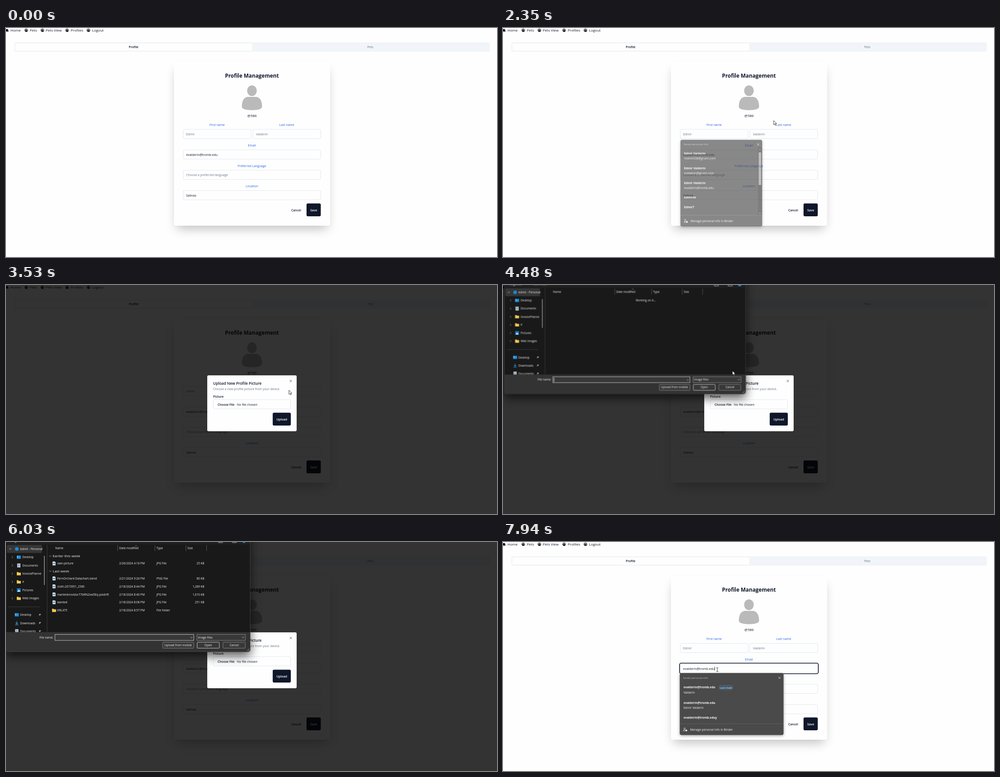
Write an HTML page that moves like this. It is 1093 px wide and 512 px high and loops after 8 s.

```html
<!DOCTYPE html>
<html lang="en">
<head>
<meta charset="utf-8">
<title>Profile management</title>
<style>
html, body { margin: 0; width: 100%; height: 100%; overflow: hidden; background: #fefefe; }
svg { display: block; width: 1093px; height: 512px; }
text { font: 400 6.9px "Open Sans", "Noto Sans", sans-serif; fill: #0f172a; }
.mid { text-anchor: middle; }
.end { text-anchor: end; }
.b { font-weight: 600; }
.nav text { font-size: 8px; }
.label text { fill: #2563eb; font-weight: 500; text-anchor: middle; }
.muted { fill: #64748b; }
.white { fill: #fff; }
.field { fill: #fefefe; stroke: #e2e8f0; }
.ring { fill: none; stroke: #0f172a; stroke-width: 1.6; }
.line { fill: none; stroke-width: .8; }
.menu text { font-size: 6.5px; fill: #f4f4f4; }
.menu .b { font-weight: 700; }
.menu .hint { font-size: 6px; fill: #b9b9b9; }
.menu > .panel { fill: #4a4a4a; filter: drop-shadow(0 2px 3px rgba(0,0,0,.35)); }
.files text { font-size: 6.5px; fill: #f2f2f2; }
.files .group { font-size: 8px; }
.box { fill: #383838; stroke: #9a9a9a; stroke-width: .8; }
.cardShadow { filter: blur(12.5px); opacity: .25; }

.anim, .ring1, .ring2, .menu, .shade, .modal, .files, .cursor, .cursor > * {
  animation: 8s linear infinite both;
}
.cursor { animation-name: move; }
.cursor .arrow { animation-name: arrow; animation-timing-function: step-end; }
.cursor .beam { animation-name: beam; animation-timing-function: step-end; }
.cursor .hand { animation-name: hand; animation-timing-function: step-end; }
.ring1 { animation-name: ring1; animation-timing-function: step-end; }
.ring2 { animation-name: ring2; animation-timing-function: step-end; }
.menu1 { animation-name: menu1; }
.menu2 { animation-name: menu2; }
.shade { animation-name: shade; animation-timing-function: ease; }
.modal { animation-name: modal; animation-timing-function: ease; transform-origin: 547.5px 264.5px; }
.files { animation-name: files; transform-origin: 265px 75px; }
.closeRing { animation-name: closeRing; animation-timing-function: step-end; }
.busy { animation-name: busy; animation-timing-function: step-end; }
.list { animation-name: list; animation-timing-function: step-end; }
.caret { animation-name: caret; animation-timing-function: step-end; }

@keyframes move {
  0%, 1.25% { transform: translate(1063px, 500px); }
  5% { transform: translate(640px, 170px); }
  7.5% { transform: translate(552px, 123px); }
  10.625%, 12.5% { transform: translate(450px, 238px); }
  16.25% { transform: translate(520px, 232px); }
  21% { transform: translate(633px, 216px); }
  21.875% { transform: translate(630px, 216px); }
  25.6% { transform: translate(612px, 191px); }
  29.375% { transform: translate(602.5px, 207px); }
  31.1% { transform: translate(590px, 200px); }
  35%, 36.25% { transform: translate(552px, 160px); }
  41.5%, 42.4% { transform: translate(629px, 229px); }
  44.125% { transform: translate(630px, 235px); }
  46.625%, 48.375% { transform: translate(591px, 268px); }
  49.125%, 50.875% { transform: translate(585px, 264px); }
  53.1%, 54.4% { transform: translate(545px, 266px); }
  56% { transform: translate(511px, 192px); }
  60.25% { transform: translate(420px, 150px); }
  68.75% { transform: translate(219px, 52px); }
  79.5% { transform: translate(330px, 110px); }
  82%, 84% { transform: translate(505px, 229px); }
  86% { transform: translate(560px, 298px); }
  89%, 89.875% { transform: translate(633px, 217px); }
  94.5%, 100% { transform: translate(477px, 285px); }
}
@keyframes arrow {
  0%, 10.4%, 34.4%, 68.75%, 88.75%, 94.2%, 100% { opacity: 0; }
  1.25%, 15%, 36.5%, 79.5%, 91% { opacity: 1; }
}
@keyframes beam {
  0%, 15% { opacity: 0; }
  10.4%, 94.2%, 100% { opacity: 1; }
}
@keyframes hand {
  0%, 36.5%, 91%, 100% { opacity: 0; }
  34.4%, 88.75% { opacity: 1; }
}
@keyframes ring1 { 0%, 28.75%, 100% { opacity: 0; } 12.5% { opacity: 1; } }
@keyframes ring2 { 0% { opacity: 0; } 95.3%, 100% { opacity: 1; } }
@keyframes menu1 {
  0%, 12.6%, 30.5%, 100% { opacity: 0; }
  13.9%, 28.75% { opacity: 1; }
  29.375% { opacity: .66; }
}
@keyframes menu2 { 0%, 95.5% { opacity: 0; } 96.75%, 100% { opacity: 1; } }
@keyframes shade { 0%, 35.75%, 91.75%, 100% { opacity: 0; } 38.25%, 89.25% { opacity: .8; } }
@keyframes modal {
  0%, 35.75%, 91.75%, 100% { opacity: 0; transform: translateY(2.5px) scale(.95); }
  38.25%, 89.25% { opacity: 1; transform: none; }
}
@keyframes files {
  0%, 55% { opacity: 0; transform: scale(.94); }
  56% { opacity: 1; transform: scale(.988); }
  58%, 84% { opacity: 1; transform: scale(1); }
  85.5%, 100% { opacity: 0; transform: scale(.95); }
}
@keyframes closeRing { 0% { opacity: 0; } 88.75%, 100% { opacity: 1; } }
@keyframes busy { 0% { opacity: 1; } 61.125%, 100% { opacity: 0; } }
@keyframes list { 0% { opacity: 0; } 61.125%, 100% { opacity: 1; } }
@keyframes caret {
  0%, 62.125%, 75.375% { opacity: 0; }
  55.5%, 68.75%, 82%, 100% { opacity: 1; }
}
</style>
</head>
<body>
<svg viewBox="0 0 1093 512">
  <defs>
    <g id="paw">
      <ellipse cx="-3.1" cy="-.4" rx=".9" ry="1.2"/>
      <ellipse cx="-1.2" cy="-2.5" rx=".95" ry="1.3"/>
      <ellipse cx="1.2" cy="-2.5" rx=".95" ry="1.3"/>
      <ellipse cx="3.1" cy="-.4" rx=".9" ry="1.2"/>
      <path d="M0-.6C1.4-.6 2.8 1.2 2.8 2.5S1.3 3.6 0 3.1S-2.8 3.8-2.8 2.5S-1.4-.6 0-.6"/>
    </g>
    <path id="x" class="line" d="M-2.3-2.3L2.3 2.3M2.3-2.3L-2.3 2.3"/>
    <path id="down" class="line" d="M-2.3-1.2L0 1.2L2.3-1.2"/>
    <path id="right" class="line" d="M-1.2-2.3L1.2 0L-1.2 2.3"/>
    <path id="folder" fill="#f6c94f" d="M-4.5-3.6h3.2l1.2 1.3H4.5V3.6h-9z"/>
    <g id="doc">
      <path fill="#f3f6f8" d="M-3.3-4.2H1.8L3.3-2.6V4.2H-3.3z"/>
      <path fill="#2b7fc0" d="M-2.2-1.5H2.2V2.4H-2.2z"/>
      <path fill="#dff0fb" d="M-1.8 2.1L0 0L1.8 2.1z"/>
    </g>
    <g id="text">
      <path fill="#c7d3da" d="M-3.6-4.4H3.6V4.4H-3.6z"/>
      <path stroke="#4f7c94" stroke-width=".9" d="M-2.2-2H2.2M-2.2 0H2.2M-2.2 2H1"/>
    </g>
    <g id="screen">
      <path fill="#1f8fdc" d="M-4.5-3.6H4.5V3.6H-4.5z"/>
      <path fill="#9fdcff" d="M-3.5-2.4h2v1.2h-2zM-3.5-.4h2v1.2h-2z"/>
    </g>
    <g id="image">
      <path fill="#1583d2" d="M-4.2-4H4.2V4H-4.2z"/>
      <path fill="#e9f6ff" d="M-3.6 3.4L0-.6L3.6 3.4z"/>
    </g>
    <path id="load" fill="none" stroke="#2fa0e6" stroke-width="1.1" d="M0-4V2M-2.6-.6L0 2L2.6-.6M-3.6 4H3.6"/>
    <circle id="dot" r="4" fill="#1c8ad8"/>
    <path id="pin" fill="#a8a8a8" d="M.4-3L3-.4L1.6 0L.4 1.8L-.6.8L-2.8 3L-3 2.8L-.9.5L-1.9-.5L0-1.6z"/>
    <g id="person" fill="none" stroke="#eee" stroke-width=".8">
      <circle cx="-1.2" cy="-2" r="1.7"/>
      <path d="M-.4 3.2H-4C-4 1-2.8.6-.6.6"/>
      <path fill="#eee" d="M.8.8H4V3.4H.8z"/>
    </g>
  </defs>

  <rect width="1093" height="512" fill="#fefefe"/>
  <g class="nav">
    <path d="M-1.5 5.2L2.2 1.8L6 5.2H5V8.8H3.1V6.4H1.4V8.8H-.6V5.2z"/>
    <use href="#paw" x="45" y="5.2"/><use href="#paw" x="81" y="5.2"/>
    <use href="#paw" x="136" y="5.2"/><use href="#paw" x="183.5" y="5.2"/>
    <text x="10" y="8.2">Home</text><text x="53" y="8.2">Pets</text>
    <text x="88.5" y="8.2">Pets View</text><text x="144" y="8.2">Profiles</text>
    <text x="191.5" y="8.2">Logout</text>
  </g>
  <rect x="18.5" y="32" width="1058.5" height="21" rx="3" fill="#f1f5f9"/>
  <rect x="21" y="34.5" width="527" height="16" rx="2" fill="#fefefe"/>
  <text class="mid b" x="284" y="45.4">Profile</text>
  <text class="mid muted" x="811" y="45.4" font-weight="500">Pets</text>

  <rect class="cardShadow" x="380" y="94.5" width="335" height="354"/>
  <rect x="374" y="76" width="347.5" height="366" rx="4" fill="#fefefe"/>
  <text class="mid" x="547.5" y="111.4" style="font-size:11.8px;font-weight:700">Profile Management</text>
  <g fill="#bababa">
    <ellipse cx="547.5" cy="140.2" rx="10.6" ry="12"/>
    <path d="M525 176C525 160 532 154 539 154H556C563 154 570 160 570 176C570 181 561 183.7 547.5 183.7S525 181 525 176"/>
  </g>
  <text class="mid" x="547.7" y="198.6" style="font-size:8px">@586</text>
  <g class="label">
    <text x="470" y="219">First name</text><text x="625" y="219">Last name</text>
    <text x="547.5" y="264.5">Email</text><text x="547.5" y="310.6">Preferred Language</text>
    <text x="547.5" y="356">Location</text>
  </g>
  <g class="field">
    <rect x="394.5" y="226.5" width="151" height="21" rx="2.5"/>
    <rect x="549.5" y="226.5" width="151" height="21" rx="2.5"/>
    <rect x="394.5" y="272.5" width="306" height="20.5" rx="2.5"/>
    <rect x="394.5" y="318" width="306" height="20.5" rx="2.5"/>
    <rect x="394.5" y="363.5" width="306" height="20.5" rx="2.5"/>
  </g>
  <text class="muted" x="401" y="239.8">Edmir</text>
  <text class="muted" x="556.5" y="239.8">Valderin</text>
  <text x="401" y="285.7">evalderin@tromb.edu</text>
  <text class="muted" x="401" y="331.2">Choose a preferred language</text>
  <text x="401" y="376.7">Salinas</text>
  <text class="mid b" x="646" y="409.6">Cancel</text>
  <rect x="669" y="392.3" width="31.7" height="28.7" rx="3" fill="#0f172a"/>
  <text class="mid b white" x="685" y="409.6">Save</text>

  <rect class="ring ring1" x="393" y="225" width="154" height="24" rx="4"/>
  <g class="ring2">
    <rect class="ring" x="393" y="270.7" width="309" height="23.8" rx="4"/>
    <path stroke="#111" stroke-width=".8" d="M471.2 278.5V287.5"/>
  </g>

  <g class="menu menu1">
    <rect class="panel" x="395" y="250" width="182" height="193.5" rx="4"/>
    <text class="hint" x="402" y="262.3">Saved personal info</text>
    <use href="#x" x="568" y="260.3" stroke="#eee"/>
    <rect x="567.5" y="267" width="9" height="151" fill="#3a3a3a"/>
    <rect x="569" y="278" width="5.8" height="73" rx="1" fill="#9b9b9b"/>
    <path class="line" stroke="#ccc" d="M569.5 273L571.8 270.8L574 273M569.5 413L571.8 415.2L574 413"/>
    <text class="b" x="403" y="282.8">Edmir Valderin</text><text x="403" y="294.3">redmir638@grulm.com</text>
    <text class="b" x="403" y="315.7">Edmir Valderin</text><text x="403" y="327">evalderin@grulm.com</text>
    <text class="b" x="403" y="348.5">Edmir Valderin</text><text x="403" y="359.8">evalderin@tromb.edu</text>
    <text class="b" x="403" y="381.4">Edmirox</text>
    <text class="b" x="403" y="402.8">Edmir7</text>
    <path stroke="#6a6a6a" stroke-width=".8" d="M395 418.5H577"/>
    <use href="#person" x="407" y="431.5"/>
    <text x="417.5" y="433.9">Manage personal info in Binder</text>
  </g>

  <g class="menu menu2">
    <rect class="panel" x="393.5" y="293" width="231" height="138.5" rx="4"/>
    <text class="hint" x="401" y="305.7">Saved personal info</text>
    <use href="#x" x="615.5" y="303.7" stroke="#eee"/>
    <text class="b" x="402" y="327.3">evalderin@tromb.edu</text>
    <rect x="479.5" y="319.3" width="33.5" height="11.7" rx="5.5" fill="#455a6b"/>
    <text class="mid" x="496.2" y="327.5" style="font-size:5.9px">Last Used</text>
    <text x="402" y="339.4">Valderin</text>
    <text class="b" x="402" y="361.7">evalderin@tromb.edu</text>
    <text x="402" y="373.2">Edmir Valderin</text>
    <text class="b" x="402" y="395.3">evalderin@tromb.eduy</text>
    <path stroke="#666" stroke-width=".8" d="M393.5 406.5H624.5"/>
    <use href="#person" x="405.5" y="419.2"/>
    <text x="416.5" y="421.6">Manage personal info in Binder</text>
  </g>

  <rect class="shade" width="1093" height="512"/>

  <g class="modal">
    <rect x="448" y="202" width="199" height="125" rx="3" fill="#fefefe"/>
    <text class="b" x="461" y="223" style="font-size:8.35px">Upload New Profile Picture</text>
    <text class="muted" x="461" y="235.2">Choose a new profile picture from your device.</text>
    <text class="b" x="461" y="252.4">Picture</text>
    <rect class="field" x="461.5" y="256.5" width="172" height="20.5" rx="2.5"/>
    <text class="b" x="471" y="269.7">Choose File</text><text x="514" y="269.7">No file chosen</text>
    <rect x="593.7" y="285.5" width="40.3" height="28.7" rx="3" fill="#0f172a"/>
    <text class="mid b white" x="613.8" y="302.5">Upload</text>
    <use href="#x" x="634" y="214.6" stroke="#333"/>
    <rect class="ring anim closeRing" x="628.3" y="209" width="11.4" height="11.4" rx="3"/>
  </g>

  <g class="files">
    <rect x="0" y="-30" width="543.5" height="275.5" rx="5" fill="#191919" stroke="#484848" stroke-width=".8"
      style="filter:drop-shadow(0 9px 11px rgba(0,0,0,.65))"/>
    <rect x=".5" y="-20" width="542.5" height="25.5" fill="#202020"/>
    <text x="12" y="0">Organize</text><text x="64" y="0">New folder</text>
    <path class="line" stroke="#ddd" d="M473-3H482V1.3H473zM504-3H513V1.3H504z"/>
    <circle cx="530" cy="-2" r="4" fill="#1c8ad8"/>
    <rect x="2" y="6.5" width="78" height="18" rx="2" fill="#363636"/>
    <g id="side"></g>
    <path stroke="#444" stroke-width=".8" d="M5 145H76M91.5 6V201"/>
    <rect x="84.7" y="31" width="1.4" height="65" fill="#a5a5a5"/>
    <text x="109.5" y="16.4">Name</text><text x="252" y="16.4">Date modified</text>
    <text x="335" y="16.4">Type</text><text x="404" y="16.4">Size</text>
    <path stroke="#666" stroke-width=".8" d="M248.5 7V20.5M331.5 7V20.5M400.5 7V20.5M446.5 7V20.5"/>
    <path class="line" stroke="#aaa" d="M287.5 9.5L289.5 7.7L291.5 9.5"/>
    <text class="mid anim busy" x="318.5" y="36.3">Working on it...</text>
    <g class="anim list">
      <text class="group" x="104" y="34.4">Earlier this week</text>
      <text class="group" x="104" y="67.9">Last week</text>
      <use href="#down" x="98.5" y="31.5" stroke="#ccc"/><use href="#down" x="98.5" y="65" stroke="#ccc"/>
      <g id="rows"></g>
    </g>
    <path fill="#333" d="M.4 201.5H543.1V240.5Q543.1 245.1 538.5 245.1H5Q.4 245.1.4 240.5z"/>
    <text class="end" x="105.5" y="215.5">File name:</text>
    <rect class="box" x="109" y="206.7" width="309" height="13.3" style="stroke:#e6e6e6"/>
    <path class="anim caret" stroke="#fff" stroke-width=".9" d="M111.7 209V218"/>
    <rect class="box" x="425" y="206.7" width="108" height="13.3"/>
    <text x="427.3" y="215.6">Image files</text>
    <use href="#down" x="413" y="213.7" stroke="#ccc"/><use href="#down" x="528" y="213.2" stroke="#ccc"/>
    <rect class="box" x="349" y="224" width="69" height="13.4" rx="1.5"/>
    <rect class="box" x="425.5" y="224" width="49.5" height="13.4" rx="1.5" style="stroke:#eee"/>
    <rect class="box" x="483" y="224" width="49.5" height="13.4" rx="1.5"/>
    <text class="mid" x="383.3" y="232.9">Upload from mobile</text>
    <text class="mid" x="450.2" y="232.9">Open</text>
    <text class="mid" x="508" y="232.9">Cancel</text>
    <path stroke="#bbb" stroke-dasharray="1 1" d="M536 243H542M538 241H542M540 239H542"/>
  </g>

  <g class="cursor" stroke="#111" stroke-width=".8" fill="#fff" stroke-linejoin="round">
    <path class="arrow" d="M0 0V9.2L2.1 7.3L3.6 10.6L5.1 9.9L3.7 6.7H6.6z"/>
    <path class="beam" fill="none" d="M-2.4-4H-.6L0-3.4L.6-4H2.4M0-3.4V4.2M-2.4 4.8H-.6L0 4.2L.6 4.8H2.4"/>
    <path class="hand" d="M-1 0Q0-1 1 0V4L3 4.3L5 5Q6.3 5.4 6.2 7L5.4 10.2V12H-.6V10.4L-3.4 6.6Q-3.2 5.2-1.9 6L-1 6.9z"/>
  </g>
</svg>
<script>
const use = (id, x, y, extra = '') => `<use href="#${id}" x="${x}" y="${y}" ${extra}/>`;
const label = (s, x, y, cls = '') => `<text class="${cls}" x="${x}" y="${y + 2.4}">${s}</text>`;
const grey = 'stroke="#aaa"';

const tree = [['screen', 'Desktop'], ['text', 'Documents'], ['folder', 'InvoicePlanne'],
  ['folder', 'P'], ['image', 'Pictures'], ['folder', 'Web Images']];
const pinned = [['screen', 'Desktop'], ['load', 'Downloads'], ['text', 'Documents']];
side.innerHTML =
  use('down', 9.5, 15.5, 'stroke="#ddd"') + use('dot', 24, 15.5) + label('edmir - Personal', 31.5, 15.5) +
  tree.map(([icon, name], i) => {
    const y = 34 + i * 18.4;
    return use('right', 14, y, grey) + use(icon, 28.5, y) + label(name, 36.5, y);
  }).join('') +
  pinned.map(([icon, name], i) => {
    const y = 162.8 + i * 18.3;
    return use(icon, 24, y) + label(name, 31.5, y) + use('pin', 75, y);
  }).join('');

const files = [
  [48, 'own-picture', '2/26/2024 4:16 PM', 'JPG File', '25 KB'],
  [81.5, 'FernOrchard Datachart.vlend', '2/21/2024 9:26 PM', 'PNG File', '80 KB'],
  [99.3, 'cloth-2073951_2560', '2/18/2024 8:44 PM', 'JPG File', '1,289 KB'],
  [117.1, 'marlenbrovista-T7bRN2xw5Eq-pixdrift', '2/18/2024 8:40 PM', 'JPG File', '1,610 KB'],
  [134.9, 'wanted', '2/18/2024 8:08 PM', 'JPG File', '251 KB'],
  [152.8, 'KRL475', '2/18/2024 8:57 PM', 'File folder', '']
];
rows.innerHTML = files.map(([y, name, date, type, size]) =>
  use(size ? 'doc' : 'folder', 107, y) + label(name, 114, y) + label(date, 252, y) +
  label(type, 335, y) + label(size, 441.5, y, 'end')).join('');
</script>
</body>
</html>
```
